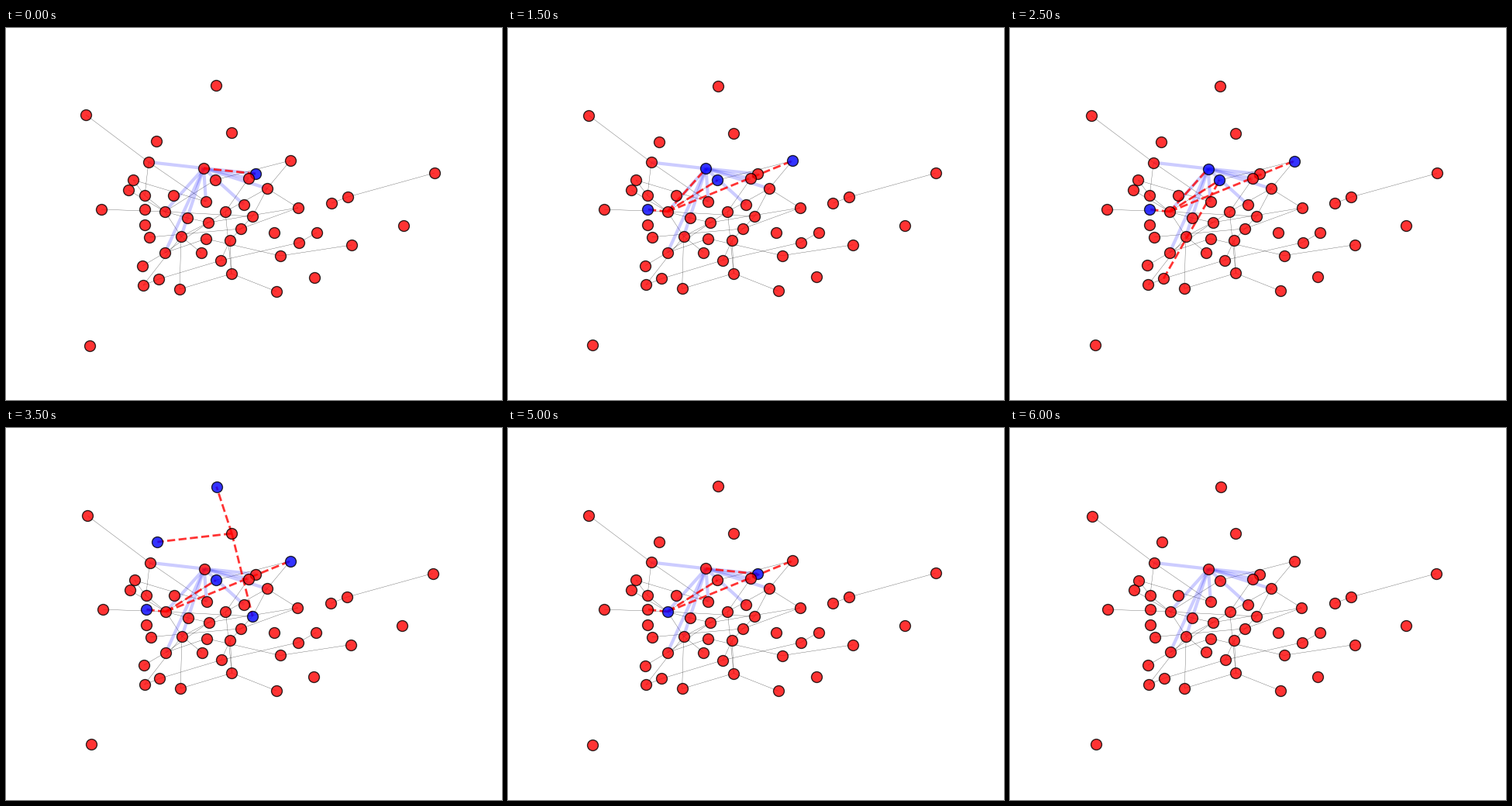
Write a matplotlib script that moves like this. It is 640 px wide and 480 px high and loops after 6500 ms.

```python
from itertools import chain, pairwise

import numpy as np
import matplotlib.pyplot as plt
from matplotlib.animation import FuncAnimation
from matplotlib.collections import LineCollection

W, H, DPI = 640, 480, 100
CENTER = np.array([328, 242.4])

# nodes that take part in messages or act as junctions
NORTH, MAST, WEST, LEFT = (271, 74), (291, 135), (194, 146), (184, 173)
HUB, RELAY, EAST, INNER = (255, 181), (322, 188), (367, 171), (270, 196)
DESK, BEND, STEP, HOOK = (313, 194), (337, 207), (258, 224), (307, 228)
GATE, NEXT, SIDE, CORE = (205, 237), (179, 234), (318, 243), (261, 251)
FORK, KNEE, SOUTH, FOOT = (226, 269), (205, 290), (197, 324), (291, 317)
PORT, YARD, POST, DOCK = (179, 216), (303, 259), (289, 274), (277, 300)
LANE, BANK = (283, 237), (377, 232)

LONERS = [NORTH, MAST, WEST, HUB, RELAY, NEXT, HOOK, (216, 216), (179, 254),
          (346, 264), (398, 322), (513, 255), (108, 410)]

# thin lines run from each node to the next one on its path
PATHS = [
    [(103, 112), LEFT, PORT, (164, 196), STEP, LEFT],
    [(123, 234), GATE, INNER, EAST, BEND, BANK, CORE, KNEE, (176, 307)],
    [(158, 209), GATE, SIDE, YARD, POST, DOCK],
    [PORT, GATE, FORK, CORE, (234, 245), GATE],
    [DESK, LANE, FOOT, (349, 340)],
    [FORK, (177, 332), SOUTH, DOCK, (378, 277), (401, 264)],
    [(252, 290), FORK, (224, 337), FOOT, POST],
    [(185, 270), YARD, BANK],
    [KNEE, (258, 272), (354, 294), (446, 280)],
    [SIDE, BEND, LANE, CORE],
    [(420, 226), (441, 218), (553, 187)],
]


def star(sender, *receivers):
    return [(sender, r) for r in receivers]


NODES = list(dict.fromkeys(chain(LONERS, *PATHS)))
LINKS = [pair for path in PATHS for pair in pairwise(path)]
BANDS = star(HUB, LEFT, RELAY, DESK, BEND, GATE, STEP, HOOK, FORK, KNEE)

ask = star(RELAY, HUB)
group = star(GATE, NEXT, INNER, EAST)
full = group + star(GATE, HUB)
report = star(SOUTH, INNER)

# calls and replies take turns
STEPS = [
    ask, ask + star(RELAY, WEST, CORE),
    group, full,
    report, full + report,
    group + star(MAST, SIDE), group + star(MAST, WEST, NORTH, SIDE),
    group, group,
    group + ask, ask,
    [],
]

fig = plt.figure(figsize=(W / DPI, H / DPI), dpi=DPI, facecolor="white")
ax = fig.add_axes([0, 0, 1, 1])
ax.set(xlim=(0, W), ylim=(H, 0))
ax.axis("off")


def add_lines(**style):
    lines = LineCollection([], zorder=1, **style)
    ax.add_collection(lines, autolim=False)
    return lines


def add_nodes(color):
    return ax.scatter([], [], s=100, c=color, edgecolors="black",
                      linewidths=1, alpha=0.8, zorder=2)


thin = add_lines(colors="black", linewidths=0.3, alpha=0.6)
bands = add_lines(colors="blue", linewidths=3, alpha=0.2)
dashes = add_lines(colors="red", linewidths=2, linestyles="dashed", alpha=0.8)
blue = add_nodes("blue")
red = add_nodes("red")


def draw(step):
    messages = STEPS[step]
    # more messages widen the view; the silent step is widest
    zoom = 1 - 0.0021 * ((len(messages) - 1) % 7)

    def place(points):
        points = np.array(points, float).reshape(-1, 2)
        return CENTER + (points - CENTER) * zoom

    for lines, pairs in (thin, LINKS), (bands, BANDS), (dashes, messages):
        lines.set_segments([place(pair) for pair in pairs])

    # senders light up on a call, receivers on a reply
    active = {pair[step % 2] for pair in messages}
    blue.set_offsets(place([n for n in NODES if n in active]))
    red.set_offsets(place([n for n in NODES if n not in active]))
    return thin, bands, dashes, blue, red


anim = FuncAnimation(fig, draw, frames=len(STEPS), interval=500,
                     init_func=lambda: draw(0), repeat=True, repeat_delay=0)
plt.show()
```
